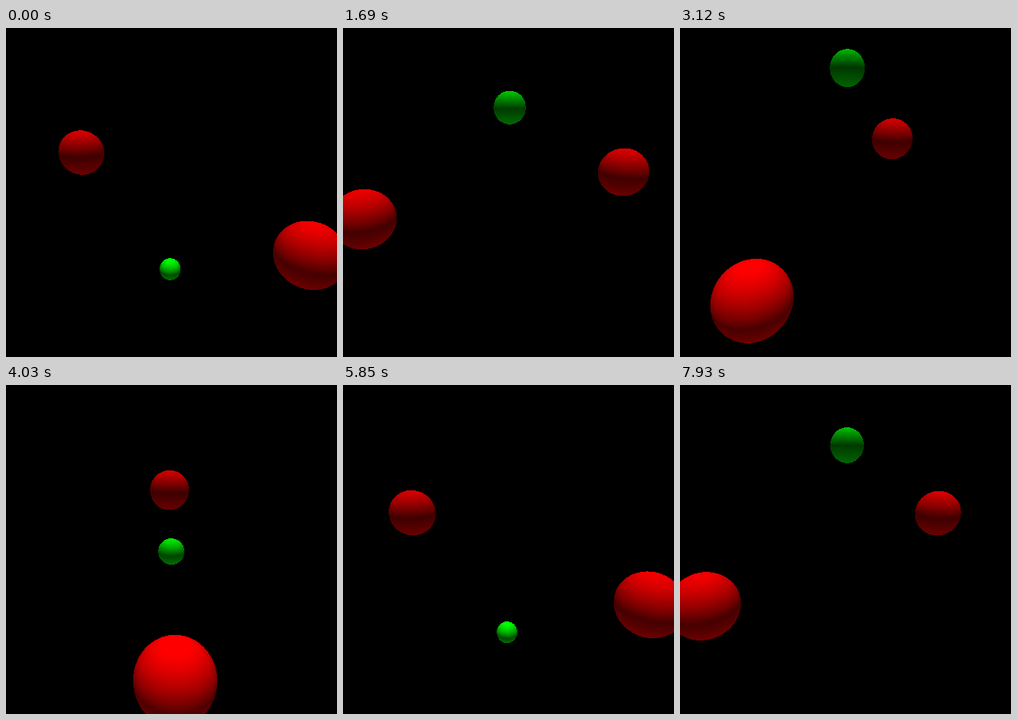
Animation of 414x412 px, one loop 8000 ms. Source, as an HTML page with a canvas:

```html
<!DOCTYPE html>
<html lang="en">
<head>
<meta charset="utf-8">
<title>Orbiting spheres</title>
<style>
  html, body { margin: 0; width: 100%; height: 100%; overflow: hidden; background: #000; }
  canvas { display: block; }
</style>
</head>
<body>
<canvas id="stage" width="414" height="412"></canvas>
<script>
const W = 414, H = 412;
const LOOP = 8000, STEP = 130;
const RAD = Math.PI / 180;

// Camera: lengths are in units of its distance to the orbit centre.
const FOCAL = 362, CX = 206.8, CY = 206.6, ROLL = 0.0161;
const SIN = 0.61, COS = 0.792;

const ORBIT = 0.4615, RED_SIZE = 0.0915, GREEN_SIZE = 0.0455;
const SHADOW = 0.3, DIFFUSE = 0.75, BOUNCE = 0.25;

const ctx = document.getElementById('stage').getContext('2d');
const image = ctx.createImageData(W, H);
const pixels = image.data;

const dot = (a, b) => a[0] * b[0] + a[1] * b[1] + a[2] * b[2];
const unit = v => v.map(n => n / Math.hypot(...v));

// Camera axes: right, down, forward.
const UP = [0, -COS, -SIN];
const BACK = [0, -SIN, COS];
const LIGHT = unit(UP.map((u, i) => u + 0.33 * BACK[i]));

function redBall(angle) {
  const x = ORBIT * Math.cos(angle), near = ORBIT * Math.sin(angle);
  return { pos: [x, near * SIN, 1 - near * COS], size: RED_SIZE, channel: 0 };
}

function greenBall(n) {
  const lift = -0.03 - 0.55 * Math.cos((30.2 + 7.66 * n) * RAD);
  const y = -256 * lift / (1 - 0.707 * lift);
  const z = 1 / (1 - y / 478);
  return { pos: [0, y * z / FOCAL, z], size: GREEN_SIZE, channel: 1 };
}

function drawBall({ pos, size, channel }) {
  const [x, y, z] = pos;
  const sx = FOCAL * x / z, sy = FOCAL * y / z;
  const midX = CX + sx - ROLL * sy, midY = CY + sy + ROLL * sx;
  const reach = FOCAL * size / z * 1.3 + 4;
  const left = Math.max(0, Math.floor(midX - reach));
  const right = Math.min(W - 1, Math.ceil(midX + reach));
  const top = Math.max(0, Math.floor(midY - reach));
  const bottom = Math.min(H - 1, Math.ceil(midY + reach));
  const gap = dot(pos, pos) - size * size;
  const gain = 0.6 - 0.45 * dot(unit(pos), UP);

  for (let py = top; py <= bottom; py++) {
    for (let px = left; px <= right; px++) {
      const dx = px + 0.5 - CX, dy = py + 0.5 - CY;
      const ray = [(dx + ROLL * dy) / FOCAL, (dy - ROLL * dx) / FOCAL, 1];
      const a = dot(ray, ray), b = dot(ray, pos);
      const disc = b * b - a * gap;
      if (disc < 0) continue;
      const d = (b - Math.sqrt(disc)) / a;
      const normal = ray.map((r, i) => (r * d - pos[i]) / size);
      const facing = dot(normal, LIGHT);
      const lit = facing > 0 ? DIFFUSE * facing : -BOUNCE * facing;
      const i = (py * W + px) * 4;
      pixels[i] = pixels[i + 1] = 0;
      pixels[i + channel] = 255 * gain * (SHADOW + lit);
    }
  }
}

function drawScene(n) {
  for (let i = 0; i < pixels.length; i += 4) {
    pixels[i] = pixels[i + 1] = pixels[i + 2] = 0;
    pixels[i + 3] = 255;
  }
  const angle = (35.2 - 4.09 * n) * RAD;
  [redBall(angle), redBall(angle + Math.PI), greenBall(n)]
    .sort((a, b) => b.pos[2] - a.pos[2])
    .forEach(drawBall);
  ctx.putImageData(image, 0, 0);
}

const start = performance.now();
let shown = -1;

function tick() {
  const n = Math.floor((performance.now() - start) % LOOP / STEP);
  if (n !== shown) drawScene(shown = n);
  requestAnimationFrame(tick);
}
tick();
</script>
</body>
</html>
```
